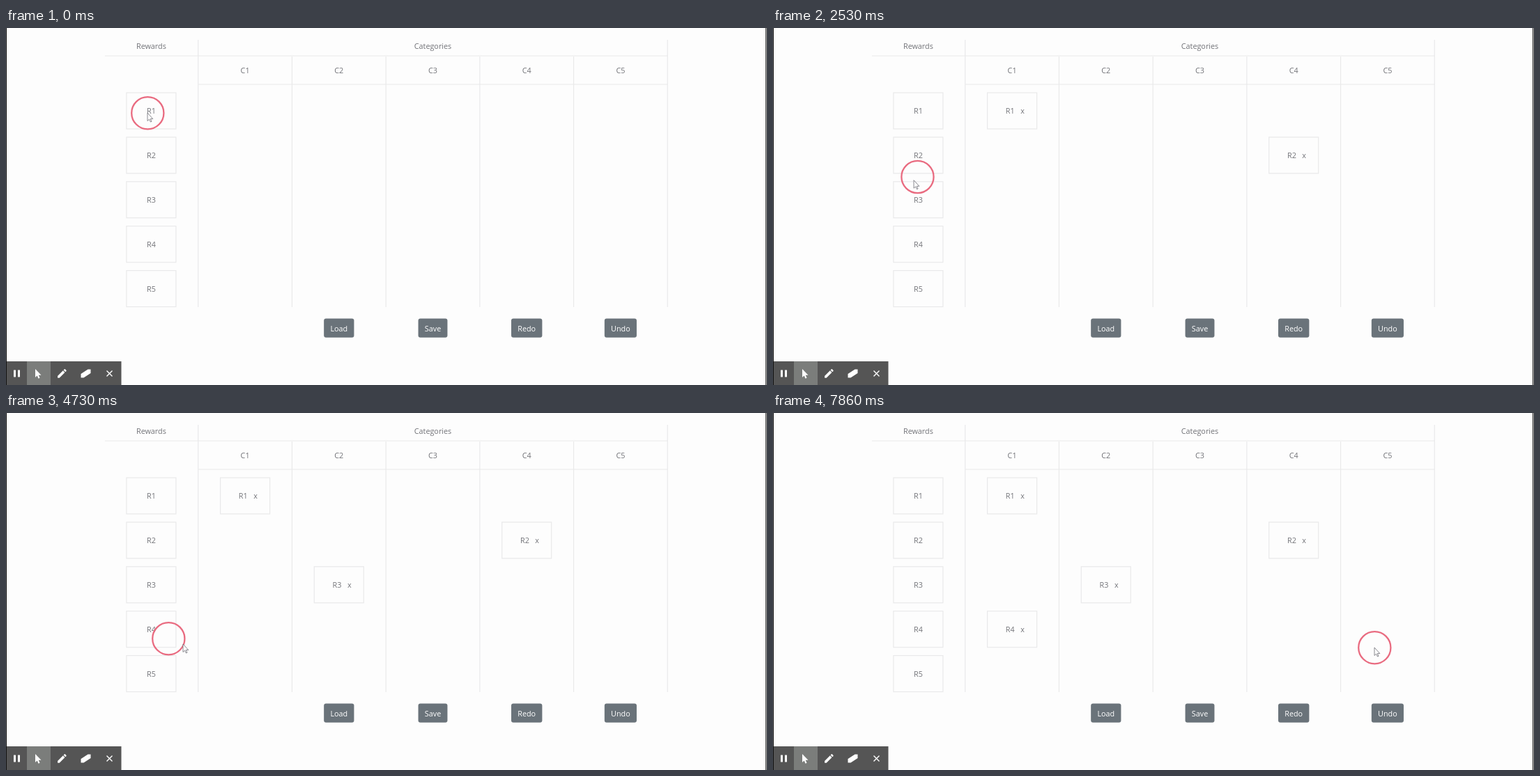
Animation of 1092x513 px, one loop 8000 ms. Source, as an HTML page:

```html
<!DOCTYPE html>
<html lang="en">
<head>
<meta charset="utf-8">
<title>Rewards board</title>
<style>
  html, body { margin: 0; width: 100%; height: 100%; overflow: hidden; background: #fdfdfd; }
  svg { display: block; width: 100%; height: 100%; }
  text { font: 10.8px "Open Sans", "Noto Sans", sans-serif; fill: #727378; text-anchor: middle; }
  .line { fill: none; stroke: #e9e9ea; stroke-width: 1.2; }
  .button rect { fill: #6a737a; }
  .button text { fill: #fff; }
  .icon { fill: #fff; }
  #ring { fill: none; stroke: #e96b80; stroke-width: 2.3; }
  #pointer { fill: #fdfdfd; stroke: #6c6c74; stroke-width: .8; }
</style>
</head>
<body>
<svg viewBox="0 0 1092 513" preserveAspectRatio="none">
  <path d="M0 0H1V513H0ZM1090 0H1091.200V513H1090Z" fill="#111"/>
  <g id="board"></g>
  <g id="toolbar">
    <path d="M1 479H165.500V513H1Z" fill="#555"/>
    <path d="M30 479H64V513H30Z" fill="#7b7d7b"/>
    <g class="icon">
      <path d="M11 491.500h3v10h-3zM17 491.500h3v10h-3z"/>
      <path d="M42 490V502L44.700 499.500L46.600 503.700L48.500 502.800L46.700 498.800H50.500Z"/>
      <path transform="translate(72 488) scale(.7)" d="M3 17.250V21h3.750L17.810 9.940l-3.750-3.750zM20.710 7.040a1 1 0 0 0 0-1.410l-2.340-2.340a1 1 0 0 0-1.410 0l-1.830 1.830 3.750 3.750z"/>
      <path d="M107.500 497L117.500 490.500H121.500V496L111.500 502.500H107.500Z"/>
      <path d="M144.500 492.500L152.500 500.500M152.500 492.500L144.500 500.500" stroke="#fff" stroke-width="1.400"/>
    </g>
  </g>
  <circle id="ring" cx=".3" cy=".2" r="23.1"/>
  <path id="pointer" d="M0 0V11.500L2.600 9.200L4.400 13L6 12.300L4.300 8.600H7.800Z"/>
</svg>
<script>
const LOOP = 8000, TICK = 200 / 3;
const PAUSE = 2, TRAVEL = 7, PULL = 2;   // ticks: rest after a drop, way back, start of a drag
const POINTER_AHEAD = 0.5;               // ticks the pointer runs before the ring

const board = document.getElementById("board");
const ring = document.getElementById("ring");
const pointer = document.getElementById("pointer");

const columnX = column => 208.4 + column * 134.7;
const rowY = row => 55.1 + row * 63.9;
const clamp = value => Math.min(1, Math.max(0, value));

function add(parent, tag, attributes = {}, text = "") {
  const node = document.createElementNS("http://www.w3.org/2000/svg", tag);
  for (const name in attributes) node.setAttribute(name, attributes[name]);
  node.textContent = text;
  return parent.appendChild(node);
}
const label = (parent, text, x, y) => add(parent, "text", { x, y }, text);
const line = d => add(board, "path", { class: "line", d });

function tile(row, column) {
  const group = add(board, "g"), x = columnX(column), y = rowY(row);
  add(group, "rect", { class: "line", x: x - 35.5, y: y - 26, width: 71, height: 52 });
  label(group, "R" + row, column ? x - 2.8 : x, y + 4);
  if (column) label(group, "x", x + 15, y + 4);
  return group;
}

function button(name, column) {
  const group = add(board, "g", { class: "button" }), x = columnX(column);
  add(group, "rect", { y: 417.6, height: 27.2, rx: 3 });
  const width = label(group, name, x, 435.7).getComputedTextLength() + 18.5;
  group.firstChild.setAttribute("x", x - width / 2);
  group.firstChild.setAttribute("width", width);
}

line("M142 40H949.5M276 81H949.5");
label(board, "Rewards", columnX(0), 30);
label(board, "Categories", columnX(3), 30);
for (let i = 0; i <= 5; i++) line(`M${columnX(i + .5)} ${i % 5 ? 41 : 17}V401`);
for (let i = 1; i <= 5; i++) {
  label(board, "C" + i, columnX(i), 64.8);
  tile(i, 0);
}
["Load", "Save", "Redo", "Undo"].forEach((name, i) => button(name, i + 2));

// One entry per reward: where it is grabbed, how far the ring follows before it
// stalls, how far the pointer gets ahead, where and when it lands.
// haste is the ease-out power, in x and y, of the way to the grab point.
const drags = [
  { column: 1, grab: [203, 122], slide: [3, 0], lead: 75, start: 3, drop: [330, 113], end: 9, haste: [3, 3] },
  { column: 4, grab: [202, 174], slide: [16, 0], lead: 75, start: 20, drop: [712, 182], end: 33, haste: [3.6, 2.6] },
  { column: 2, grab: [199, 247], slide: [20, 1], lead: 75, start: 48, drop: [489, 235], end: 57, haste: [7.4, 1.2] },
  { column: 1, grab: [210, 306], slide: [23, 18], lead: 21, start: 69, drop: [330, 322], end: 79, haste: [3, 3] },
  { grab: [198, 393], slide: [2, 0], lead: 100, start: 92, drop: [863, 337], end: 117, haste: [3, 3] }
];
drags.forEach((drag, i) => { if (drag.column) drag.tile = tile(i + 1, drag.column); });

function ringAt(tick, last, next) {
  if (!next) return last.drop;
  const from = last ? last.drop : next.grab;
  const travel = last ? clamp((tick - last.end - PAUSE) / TRAVEL) : 1;
  const pull = clamp((tick - next.start) / PULL);
  return next.grab.map((goal, axis) =>
    goal + (from[axis] - goal) * (1 - travel) ** next.haste[axis] + next.slide[axis] * pull);
}

function pointerAt(tick, last, next) {
  const [x, y] = ringAt(tick + POINTER_AHEAD, last, next);
  const pull = next ? clamp((tick - next.start) / PULL) : 0;
  return [x + next?.lead * pull || x, y + 8 * pull];
}

function place(node, [x, y]) {
  node.setAttribute("transform", `translate(${x} ${y})`);
}

function draw(now) {
  const tick = Math.floor((now % LOOP + 7) / TICK);
  const next = drags.find(drag => drag.end > tick);
  const last = drags.findLast(drag => drag.end <= tick);
  place(ring, ringAt(tick, last, next));
  place(pointer, pointerAt(tick, last, next));
  for (const { tile, end } of drags) tile?.setAttribute("visibility", tick >= end ? "visible" : "hidden");
}

const begin = performance.now();
function loop() {
  draw(performance.now() - begin);
  requestAnimationFrame(loop);
}
loop();
</script>
</body>
</html>
```
